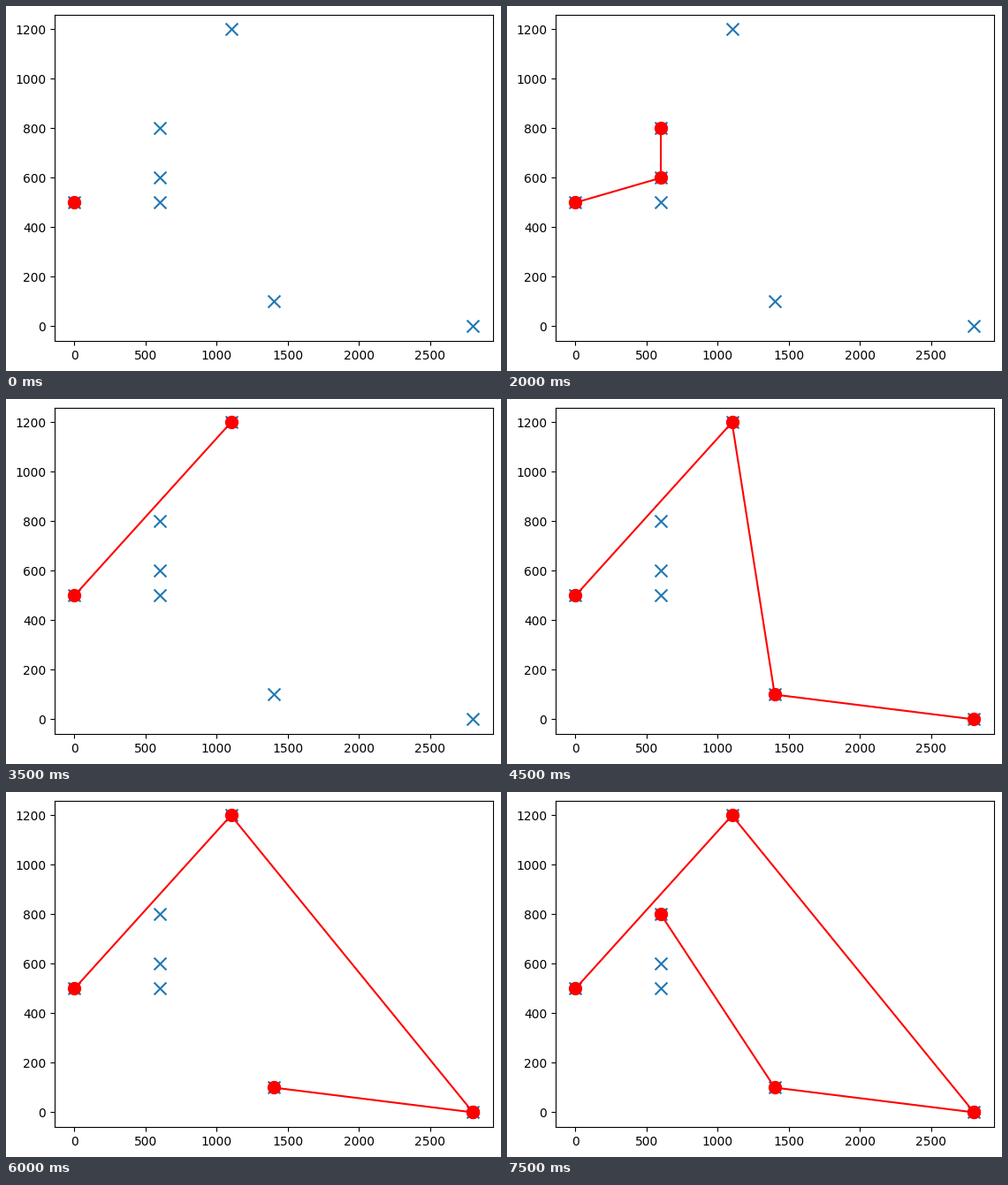
Write a matplotlib script that moves like this. It is 560 px wide and 413 px high and loops after 8 s.

```python
import itertools

import matplotlib.pyplot as plt
from matplotlib.animation import FuncAnimation

W, H, DPI = 560, 413, 100
AX_W, AX_H, PAD = 496, 369.6, 10
STEPS = 16

POINTS = sorted([(0, 500), (600, 500), (600, 600), (600, 800),
                 (1100, 1200), (1400, 100), (2800, 0)])


def turns_left(a, b, c):
    return (b[0] - a[0]) * (c[1] - a[1]) > (b[1] - a[1]) * (c[0] - a[0])


def chain_steps(points):
    """Yield the half hull after every point added or dropped."""
    chain = []
    for p in points:
        chain.append(p)
        yield list(chain)
        while len(chain) > 2 and turns_left(*chain[-3:]):
            del chain[-2]
            yield list(chain)


def hull_steps(points):
    """Upper half from left to right, then the lower half back."""
    upper = []
    for upper in chain_steps(points):
        yield upper
    for lower in chain_steps(points[::-1]):
        yield upper + lower


steps = list(itertools.islice(hull_steps(POINTS), STEPS))

fig = plt.figure(figsize=(W / DPI, H / DPI), dpi=DPI)


def place(left, bottom):
    return [left / W, bottom / H, AX_W / W, AX_H / H]


left, bottom = 55, 34
ax = fig.add_axes(place(left, bottom))
ax.scatter(*zip(*POINTS), s=100, marker="x")
ax.set_xlim(-140, 2940)
ax.set_ylim(-60, 1260)
path, = ax.plot([], [], "ro-", markersize=10)

# Leave an even margin outside the tick labels.
box = fig.get_tightbbox()
ax.set_position(place(left + PAD - box.x0 * DPI, bottom + PAD - box.y0 * DPI))


def update(i):
    path.set_data(*zip(*steps[i]))
    return path,


anim = FuncAnimation(fig, update, frames=STEPS, interval=500,
                     repeat=True, repeat_delay=0)
plt.show()
```
